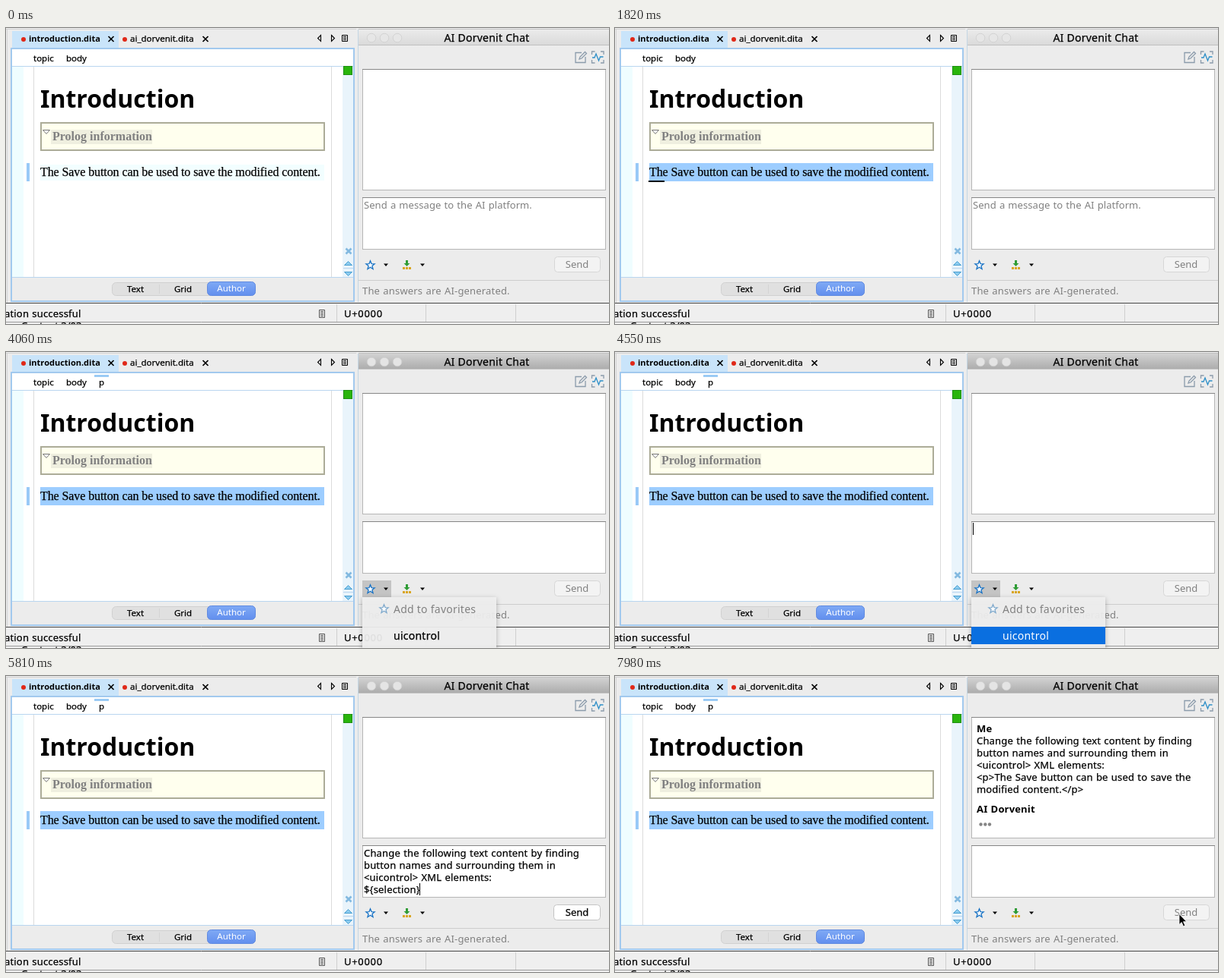
An HTML page that plays this animation: 792x390 px, repeating every 8000 ms.

```html
<!DOCTYPE html>
<html lang="en">
<head>
<meta charset="utf-8">
<title>Editor with AI chat</title>
<style>
html, body { margin: 0; width: 100%; height: 100%; overflow: hidden; background: #ececec; }
svg { display: block; width: 100vw; height: 100vh; }
text { font: 13px "Noto Sans", "Open Sans", sans-serif; fill: #000; stroke: #000; stroke-width: .25px; white-space: pre; }
.ui { word-spacing: .7px; letter-spacing: .17px; }
.hint { word-spacing: .7px; letter-spacing: .06px; }
.small { font-size: 11.5px; }
.tab { font-size: 11px; font-weight: 700; }
.big { font-size: 14px; letter-spacing: .25px; }
.head { font-size: 32px; }
.mid { text-anchor: middle; }
.code { letter-spacing: .7px; }
.doc { font: 16px "Liberation Serif", "Noto Serif", serif; letter-spacing: -.09px; }
.label { letter-spacing: 0; }
.bold { font-weight: 700; }
.bold, .tab { stroke: none; }
.gray { fill: #808080; stroke: none; }
.white { fill: #fff; stroke: none; }
.line { fill: none; stroke: #000; }

/* 1% = 80 ms */
.a { opacity: 0; animation: 8s step-end infinite; }
.select { animation-name: select; }
.click { animation-name: click; }
.idle { animation-name: idle; }
.space { animation-name: space; }
.blink { animation-name: blink; }
.crumb { animation-name: crumb; }
.hover { animation-name: hover; }
.before { animation-name: before; }
.focus { animation-name: focus; }
.menu { animation-name: menu; }
.pick { animation-name: pick; }
.caret { animation-name: caret; }
.draft { animation-name: draft; }
.end { animation-name: end; }
.nodraft { animation-name: nodraft; }
.sent { animation-name: sent; }
.dot1 { animation-name: dot1; }
.dot2 { animation-name: dot2; }
@keyframes select { 0% { opacity: 0 } 22.75% { opacity: 1 } }
@keyframes click { 0% { opacity: 0 } 18.375% { opacity: 1 } 20.125% { opacity: 0 } }
@keyframes idle { 0% { opacity: 1 } 18.375% { opacity: 0 } 22.75% { opacity: 1 } }
@keyframes space { 0% { opacity: 0 } 18.375% { opacity: 1 } 22.75% { opacity: 0 } }
@keyframes blink { 0% { opacity: 0 } 22.75% { opacity: 1 } 28.875% { opacity: 0 } 35.875% { opacity: 1 } 42% { opacity: 0 } }
@keyframes crumb { 0% { opacity: 0 } 28% { opacity: 1 } }
@keyframes hover { 0% { opacity: 0 } 37.625% { opacity: .5 } 38.5% { opacity: 1 } 43.75% { opacity: 0 } }
@keyframes before { 0% { opacity: 1 } 43.75% { opacity: 0 } }
@keyframes focus { 0% { opacity: 0 } 43.75% { opacity: 1 } }
@keyframes menu { 0% { opacity: 0 } 43.75% { opacity: 1 } 59.5% { opacity: 0 } }
@keyframes pick { 0% { opacity: 0 } 51.625% { opacity: 1 } 57.75% { opacity: 0 } 58.625% { opacity: 1 } 59.5% { opacity: 0 } }
@keyframes caret { 0% { opacity: 0 } 43.75% { opacity: 1 } 50.75% { opacity: 0 } 56.875% { opacity: 1 } 59.5% { opacity: 0 } 91% { opacity: 1 } 97.125% { opacity: 0 } }
@keyframes draft { 0% { opacity: 0 } 59.5% { opacity: 1 } 91% { opacity: 0 } }
@keyframes end { 0% { opacity: 0 } 59.5% { opacity: 1 } 66.5% { opacity: 0 } 72.625% { opacity: 1 } 79.625% { opacity: 0 } 86.625% { opacity: 1 } 91% { opacity: 0 } }
@keyframes nodraft { 0% { opacity: 1 } 59.5% { opacity: 0 } 91% { opacity: 1 } }
@keyframes sent { 0% { opacity: 0 } 91% { opacity: 1 } }
@keyframes dot1 { 0% { opacity: 1 } 92.75% { opacity: .75 } 94.5% { opacity: .6 } 95.375% { opacity: .5 } 97.125% { opacity: .75 } 98% { opacity: 1 } }
@keyframes dot2 { 0% { opacity: 1 } 97.125% { opacity: .85 } 98% { opacity: .7 } 99.75% { opacity: 1 } }
</style>
</head>
<body>
<svg viewBox="0 0 792 390" preserveAspectRatio="none">
  <defs>
    <linearGradient id="bar" x2="0" y2="1"><stop stop-color="#ebebeb"/><stop offset="1" stop-color="#dadada"/></linearGradient>
    <linearGradient id="active" x2="0" y2="1"><stop stop-color="#d2d2d2"/><stop offset="1" stop-color="#adadad"/></linearGradient>
    <linearGradient id="blue" x2="0" y2="1"><stop stop-color="#7fa9f5"/><stop offset="1" stop-color="#628fee"/></linearGradient>
    <filter id="shade" x="-10%" y="-20%" width="120%" height="140%"><feDropShadow dx="0" dy="2" stdDeviation="3" flood-opacity=".3"/></filter>
    <path id="star" d="M0-5.8 1.5-1.9 5.6-1.7 2.4.9 3.5 5 0 2.7-3.5 5-2.4.9-5.6-1.7-1.5-1.9Z" fill="#fff" stroke-width="1.3"/>
    <path id="down" d="M-3-1.5h6L0 2Z"/>
    <path id="cross" d="m-3.5-3.5 7 7m0-7-7 7"/>
    <g id="lights"><circle cx="480" cy="13" r="5.800"/><circle cx="497" cy="13" r="5.800"/><circle cx="514" cy="13" r="5.800"/></g>
  </defs>

  <rect width="792" height="390" fill="#ececec"/>
  <path d="M0 1.5h460M1.5 2v360" stroke="#d2d2d2"/>

  <!-- tabs -->
  <rect x="8" y="4" width="140" height="23" fill="#c9e4fa"/>
  <circle cx="23" cy="15" r="3" fill="#e02818"/>
  <text class="tab" x="30" y="18">introduction.dita</text>
  <circle cx="156" cy="15" r="3" fill="#e02818"/>
  <text class="small" x="163" y="18">ai_dorvenit.dita</text>
  <g class="line" stroke-width="1.7">
    <use href="#cross" x="138" y="14.5"/>
    <use href="#cross" x="262" y="14.5"/>
  </g>
  <g class="line">
    <path d="m413.500 9.500-4 4 4 4ZM427.500 9.500l4 4-4 4Z" stroke-width="1.1"/>
    <path d="M441.500 9.500h7v8h-7ZM443 11.500h4M443 13.500h4M443 15.500h4"/>
  </g>

  <!-- editor -->
  <rect x="7" y="27" width="450" height="333" fill="#ececec" stroke="#a2c9ee" stroke-width="2"/>
  <rect x="8" y="28" width="448" height="23" fill="#fff"/>
  <rect x="8" y="51" width="434" height="277" fill="#fff"/>
  <rect x="8" y="51" width="15" height="277" fill="#effdff"/>
  <rect x="442" y="51" width="14" height="277" fill="#e9f4fb"/>
  <path d="M8 50.500h448M8 328.500h448" stroke="#b9d6f0"/>
  <path d="M36.500 51v277M427.500 51v277" stroke="#dcdcdc"/>
  <text class="small" x="36" y="44">topic</text>
  <text class="small" x="79" y="44">body</text>
  <g class="a crumb">
    <rect x="116" y="30" width="19" height="3" fill="#9bcbf5"/>
    <text class="small" x="122" y="44">p</text>
  </g>

  <text class="head bold" x="45" y="105">Introduction</text>
  <rect x="46" y="125" width="372" height="36" fill="#ffffee" stroke="#acac98" stroke-width="2"/>
  <path d="M48.500 134.500h9l-4.500 5Z" fill="#fff" stroke="#777"/>
  <rect x="59" y="134" width="133" height="19" fill="#efefdf"/>
  <text class="doc label bold gray" x="61" y="148">Prolog information</text>

  <rect x="27" y="178" width="4" height="24" fill="#99c9f7"/>
  <rect x="45" y="180" width="373" height="21" fill="#f2feff"/>
  <rect class="a select" x="45" y="178" width="373" height="24" fill="#9dcdff"/>
  <text class="doc" x="45" y="195">The Save button can be used to save the modified content.</text>
  <path class="a click" d="M279 178h1.500v23H300v2H279Z"/>
  <rect class="a blink" x="44" y="201" width="21" height="2"/>

  <rect x="443.500" y="50.500" width="11" height="11" fill="#29b50c" stroke="#1f8f10"/>
  <g fill="#8cccf0" stroke="#4a9fd0">
    <use href="#cross" x="450" y="294" stroke="#82b9e0" stroke-width="2.6"/>
    <path d="m444.500 312.500 5-5 5 5ZM444.500 321.500h10l-5 5Z"/>
    <path d="M443 316.500h13" stroke="#b9d6f0"/>
  </g>

  <!-- view switch -->
  <rect x="139.500" y="335.500" width="188" height="17" rx="5" fill="#e0e0e0" stroke="#d0d0d0"/>
  <path d="M201.500 338v12" stroke="#d4d4d4"/>
  <rect x="264.500" y="334.500" width="63" height="18" rx="5" fill="url(#blue)" stroke="#608ae0"/>
  <text class="small mid" x="170" y="348">Text</text>
  <text class="small mid" x="232.500" y="348">Grid</text>
  <text class="small mid white" x="296" y="347">Author</text>

  <!-- chat panel -->
  <rect x="463" width="329" height="362" fill="#ececec"/>
  <rect x="463" y="2" width="329" height="20" fill="url(#bar)"/>
  <use class="a before" href="#lights" fill="#e6e6e6" stroke="#d2d2d2"/>
  <g class="a focus">
    <rect x="463" y="2" width="329" height="20" fill="url(#active)"/>
    <use href="#lights" fill="#e4e4e4" stroke="#d0d0d0"/>
  </g>
  <path d="M463 1.500h329M463 22.500h329" stroke="#c0c0c0"/>
  <path d="M462.500 2v359" stroke="#c4d6e4"/>
  <text class="big mid" x="631.500" y="18">AI Dorvenit Chat</text>
  <g fill="none" stroke="#8b9bab" stroke-width="1.3">
    <path d="M756 32.500h-8v13h13V38"/>
    <path d="m753 41 1-3 6.500-6.500 2 2L756 40Z" fill="#ececec"/>
    <path d="M769.500 35v-4h4M781 31h4v4M785 42v4h-4M773.500 46h-4v-4"/>
    <path d="M770 39h3l2-5 3.500 9 2-5h4" stroke="#2d8fc8"/>
  </g>
  <g fill="#fff" stroke="#b6b6b6">
    <rect x="468.500" y="54.500" width="319" height="159"/>
    <rect x="468.500" y="223.500" width="319" height="68"/>
    <path d="M468 54.500h320M468 223.500h320" stroke="#868686"/>
  </g>

  <g class="a sent">
    <text class="ui bold" x="475" y="74">Me</text>
    <text class="ui" x="475" y="90">Change the following text content by finding</text>
    <text class="ui" x="475" y="106">button names and surrounding them in</text>
    <text class="ui" x="475" y="122">&lt;uicontrol&gt; XML elements:</text>
    <text class="ui" x="475" y="138">&lt;p&gt;The Save button can be used to save the</text>
    <text class="ui" x="475" y="154">modified content.&lt;/p&gt;</text>
    <text class="ui bold" x="475" y="180">AI Dorvenit</text>
    <g fill="#858585">
      <circle class="a dot1" cx="480.500" cy="195.500" r="2.200"/>
      <circle class="a dot2" cx="486.300" cy="195.500" r="2.200"/>
      <circle cx="492" cy="195.500" r="2.200"/>
    </g>
  </g>

  <text class="hint gray a before" x="470" y="238">Send a message to the AI platform.</text>
  <rect class="a caret" x="470" y="225" width="1" height="16"/>
  <g class="a draft">
    <text class="ui" x="470" y="238">Change the following text content by finding</text>
    <text class="ui" x="470" y="254">button names and surrounding them in</text>
    <text class="ui" x="470" y="270">&lt;uicontrol&gt; XML elements:</text>
    <text class="ui" x="470" y="286">${selection}</text>
  </g>
  <rect class="a end" x="543" y="273" width="1" height="16"/>

  <rect class="a hover" x="468.500" y="301.500" width="37" height="21" fill="#f1f1f1" stroke="#c2c2c2"/>
  <rect class="a menu" x="468" y="301" width="38" height="22" fill="#c4c4c4"/>
  <use href="#star" x="478.500" y="312.500" stroke="#1872c4"/>
  <use href="#down" x="499" y="312"/>
  <path d="M525 306h3v4h2.500l-4 4-4-4h2.500Z" fill="#2f9c35"/>
  <path d="M521 315h3v3h-3ZM525 315h3v3h-3ZM529 315h3v3h-3Z" fill="#d9a520"/>
  <use href="#down" x="547" y="312"/>
  <g class="a nodraft">
    <rect x="720.500" y="301.500" width="60" height="20" rx="4" fill="#f3f3f3" stroke="#d6d6d6"/>
    <text class="mid gray" x="750" y="316">Send</text>
  </g>
  <g class="a draft">
    <rect x="719.500" y="301.500" width="61" height="20" rx="4" fill="#fff" stroke="#c4c4c4"/>
    <text class="mid" x="750" y="316">Send</text>
  </g>
  <path d="M463 332.500h329" stroke="#cdcdcd"/>
  <text class="ui gray" x="468" y="351">The answers are AI-generated.</text>

  <!-- status bar -->
  <rect y="362" width="792" height="28" fill="#efefef"/>
  <path d="M0 362.500h792" stroke="#484848"/>
  <path d="M434.500 364v23M551.500 364v23M669.500 364v23" stroke="#cfcfcf"/>
  <path d="M0 387.500h792" stroke="#9a9a9a"/>
  <text x="20" y="397">Content.3/03</text>
  <text class="ui" x="-2" y="381">ation successful</text>
  <path class="line" d="M411.500 371.500h7v10h-7ZM413 373.500h4M413 375.500h4M413 377.500h4M413 379.500h4" style="stroke:#555"/>
  <text class="code a idle" x="444" y="381">U+0000</text>
  <text class="code a space" x="444" y="381">U+0020</text>

  <!-- favorites menu -->
  <g class="a menu">
    <path d="M468 323h176v80H468Z" fill="#efefef" fill-opacity=".92" filter="url(#shade)"/>
    <use href="#star" x="496.500" y="338.500" stroke="#7fa9cc"/>
    <text class="big gray" x="509" y="344">Add to favorites</text>
    <text class="big" x="509" y="379">uicontrol</text>
    <g class="a pick">
      <rect x="468" y="362" width="176" height="23" fill="#0a6fe0"/>
      <text class="big white" x="509" y="379">uicontrol</text>
    </g>
  </g>

  <path class="a sent" d="M741 313.500v14l3.200-3 2.300 5.300 2.300-1-2.300-5.100h4.300Z" stroke="#fff" stroke-width=".8"/>
</svg>
</body>
</html>
```
